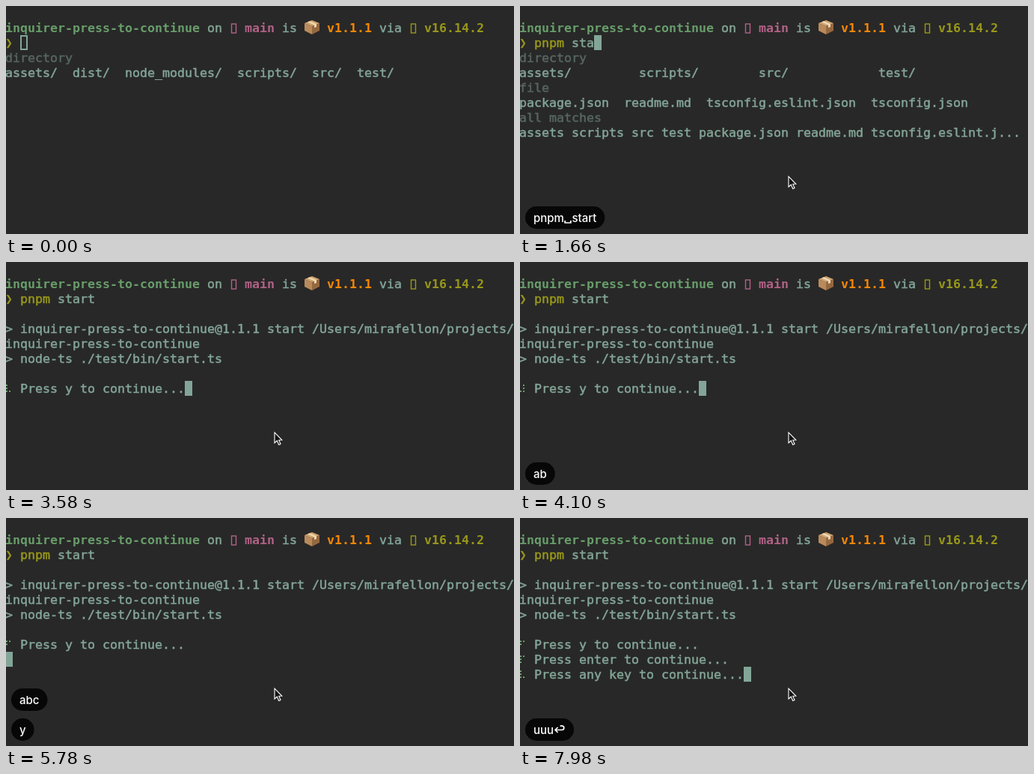
These frames come from a looping animation (679 px wide and 305 px high, 8000 ms). An HTML page with a canvas:

```html
<!DOCTYPE html>
<html lang="en">
<head>
<meta charset="utf-8">
<title>Terminal prompt demo</title>
<style>
  html, body { margin: 0; width: 100%; height: 100%; overflow: hidden; background: #282828; }
  canvas { display: block; }
</style>
</head>
<body>
<canvas id="stage" width="679" height="305"></canvas>
<script>
const ctx = document.getElementById('stage').getContext('2d');
const LOOP = 8000, CELL = 10, LINE = 20, LEFT = -1, TOP = 19;
const MONO = '16.61px "DejaVu Sans Mono", monospace';
const SANS = '500 15px Inter, sans-serif';
const color = {
  bg: '#282828', text: '#83a598', dim: '#56665f', green: '#689d6a',
  pink: '#b16286', orange: '#ff8700', olive: '#98971a'
};

const x = col => LEFT + col * CELL;
const y = row => TOP + row * LINE;

// A thin outline gives regular text its medium weight.
function write(row, col, text, fill = color.text, bold = false) {
  ctx.font = (bold ? 'bold ' : '') + MONO;
  ctx.fillStyle = ctx.strokeStyle = fill;
  ctx.fillText(text, x(col), y(row) + 16);
  if (bold) return;
  ctx.lineWidth = 0.5;
  ctx.strokeText(text, x(col), y(row) + 16);
}

function polygon(points, fill) {
  ctx.beginPath();
  points.forEach(([px, py]) => ctx.lineTo(px, py));
  ctx.closePath();
  ctx.fillStyle = fill;
  ctx.fill();
}

function missingGlyph(col, stroke) {
  ctx.strokeStyle = stroke;
  ctx.lineWidth = 1.4;
  ctx.strokeRect(x(col) + 2.5, 24, 6, 12);
}

function parcel(px, py) {
  ctx.save();
  ctx.translate(px, py);
  polygon([[0, 5], [10, 9], [10, 20], [0, 15]], '#b98a5b');
  polygon([[20, 5], [10, 9], [10, 20], [20, 15]], '#96683f');
  polygon([[0, 5], [10, 1], [20, 5], [10, 9]], '#d2a36f');
  polygon([[4, 3.4], [7, 2.2], [16, 6], [16, 10], [13, 11], [13, 7.5]], '#ecd9b4');
  ctx.restore();
}

function cursor(row, col, solid = true) {
  if (solid) {
    ctx.fillStyle = color.text;
    ctx.fillRect(x(col), y(row), CELL, LINE);
  } else {
    ctx.strokeStyle = color.text;
    ctx.lineWidth = 2;
    ctx.strokeRect(x(col) + 1, y(row) + 1, CELL - 2, LINE - 2);
  }
}

function header() {
  write(0, 0, 'inquirer-press-to-continue', color.green, true);
  write(0, 27, 'on');
  missingGlyph(30, color.pink);
  write(0, 32, 'main', color.pink, true);
  write(0, 37, 'is');
  parcel(399, 18);
  write(0, 43, 'v1.1.1', color.orange, true);
  write(0, 50, 'via');
  missingGlyph(54, color.olive);
  write(0, 56, 'v16.14.2', color.olive, true);
  write(1, 0, '❯', color.olive, true);
}

// Command typing; the shell echoes each key a little late.
const command = 'pnpm start';
const keyTimes = [980, 1060, 1130, 1200, 1280, 1360, 1440, 1500, 1560, 1600];
const ECHO = 140, RUN = 1880, OUTPUT = 2100;
const typedBy = t => keyTimes.filter(k => k <= t).length;

function completions(filtered) {
  write(2, 0, 'directory', color.dim);
  if (!filtered) {
    write(3, 0, 'assets/  dist/  node_modules/  scripts/  src/  test/');
    return;
  }
  ['assets/', 'scripts/', 'src/', 'test/'].forEach((name, i) => write(3, i * 16, name));
  write(4, 0, 'file', color.dim);
  write(5, 0, 'package.json  readme.md  tsconfig.eslint.json  tsconfig.json');
  write(6, 0, 'all matches', color.dim);
  write(7, 0, 'assets scripts src test package.json readme.md tsconfig.eslint.j...');
}

function shell(t) {
  header();
  const count = t >= RUN ? command.length : typedBy(t - ECHO);
  write(1, 2, command.slice(0, Math.min(count, 4)), color.olive);
  write(1, 6, command.slice(4, Math.max(count, 4)));
  if (t < RUN) {
    completions(count > 5);
    cursor(1, 2 + count, t >= 400);
  } else if (t < OUTPUT) {
    cursor(2, 0);
  } else {
    write(3, 0, '> inquirer-press-to-continue@1.1.1 start /Users/mirafellon/projects/');
    write(4, 0, 'inquirer-press-to-continue');
    write(5, 0, '> node-ts ./test/bin/start.ts');
    prompts(t);
  }
}

// Every tick, and every ignored key, advances the spinner by one step.
const TICK = 102.3, BLANK = 20;
const steps = [
  { key: 'y', shown: 2320, spin: 2940, stop: 5680, keys: [3700, 3960, 4600] },
  { key: 'enter', shown: 5800, spin: 6300, stop: 6840, keys: [6400, 6520, 6640] },
  { key: 'any key', shown: 6940, spin: 7200, stop: 7900, keys: [], last: true }
];
const spinner = ['124', '145', '1456', '456', '3456', '356', '236', '1236', '123', '1234'];

function braille(row, dots) {
  ctx.fillStyle = color.green;
  for (const dot of dots) {
    const i = dot - 1;
    ctx.fillRect(i < 3 ? 0 : 4, y(row) + 5 + (i % 3) * 4, 2, 2);
  }
}

function prompts(t) {
  let row = 7, col = 0;
  const now = Math.floor(t / 20) * 20;
  steps.forEach((step, i) => {
    if (now < step.shown) return;
    const running = now < step.stop;
    const elapsed = Math.min(now, step.stop) - step.spin;
    const tick = Math.floor(elapsed / TICK);
    const blank = running && elapsed >= 0 && elapsed - tick * TICK < BLANK;
    row = 7 + i;
    col = 0;
    if (blank) return;
    const ignored = step.keys.filter(k => k <= now).length;
    const frame = Math.max(0, tick + 1) + ignored;
    const text = `Press ${step.key} to continue...`;
    braille(row, spinner[frame % spinner.length]);
    write(row, 2, text);
    if (running || step.last) col = 2 + text.length;
    else row++;
  });
  cursor(row, col);
}

// Keystroke bubbles: each one is pushed up by the next and fades after a pause.
const LINGER = 1400, FADE = 200;
const bubbles = [
  { text: 'pnpm␣start↩', times: [...keyTimes, 1720] },
  { text: 'abc', times: [3700, 3960, 4600] },
  { text: 'y', times: [5640] },
  { text: 'uuu↩', times: [6400, 6520, 6640, 6840] }
];

const symbols = {
  '␣': { width: 10.5, draw(px, py) {
    ctx.moveTo(px + 1.2, py - 2);
    ctx.lineTo(px + 1.2, py + 1);
    ctx.lineTo(px + 9, py + 1);
    ctx.lineTo(px + 9, py - 2);
  } },
  '↩': { width: 16, draw(px, py) {
    ctx.moveTo(px + 5.5, py - 9);
    ctx.lineTo(px + 2, py - 5.5);
    ctx.lineTo(px + 5.5, py - 2);
    ctx.moveTo(px + 2, py - 5.5);
    ctx.lineTo(px + 11, py - 5.5);
    ctx.arc(px + 11, py - 8.2, 2.7, Math.PI / 2, -Math.PI / 2, true);
    ctx.lineTo(px + 8.5, py - 10.9);
  } }
};

function bubble(text, top, alpha) {
  ctx.save();
  ctx.globalAlpha = alpha;
  ctx.font = SANS;
  const parts = text.split(/([␣↩])/).filter(Boolean);
  const widthOf = part => symbols[part] ? symbols[part].width : ctx.measureText(part).width;
  const width = parts.reduce((sum, part) => sum + widthOf(part), 22);
  ctx.fillStyle = '#070707';
  ctx.beginPath();
  ctx.roundRect(7, top, width, 30, 15);
  ctx.fill();
  ctx.fillStyle = ctx.strokeStyle = '#fff';
  ctx.lineWidth = 1.7;
  let px = 18;
  for (const part of parts) {
    if (symbols[part]) {
      ctx.beginPath();
      symbols[part].draw(px, top + 21);
      ctx.stroke();
    } else {
      ctx.fillText(part, px, top + 21);
    }
    px += widthOf(part);
  }
  ctx.restore();
}

function keystrokes(t) {
  bubbles.forEach(({ text, times }, i) => {
    const count = times.filter(k => k <= t).length;
    const alpha = Math.min(1, 1 - (t - times[times.length - 1] - LINGER) / FADE);
    if (!count || alpha <= 0) return;
    const next = bubbles[i + 1];
    const pushed = next && t >= next.times[0];
    bubble(text.slice(0, count), pushed ? 228 : 268, alpha);
  });
}

function pointer(t) {
  if (t < 380) return;
  const rest = (1 - Math.min(1, (t - 380) / 280)) ** 2;
  ctx.save();
  ctx.translate(359 + 5 * rest, 228 + 26 * rest);
  polygon([[0, 0], [0, 14], [3.3, 11], [5.7, 16.5], [8, 15.5], [5.7, 10.2], [9.8, 10]], '#111');
  ctx.strokeStyle = '#fff';
  ctx.lineWidth = 1.1;
  ctx.stroke();
  ctx.restore();
}

function draw(now) {
  const t = now % LOOP;
  ctx.fillStyle = color.bg;
  ctx.fillRect(0, 0, 679, 305);
  shell(t);
  keystrokes(t);
  pointer(t);
}

const start = performance.now();
function loop() {
  draw(performance.now() - start);
  requestAnimationFrame(loop);
}
loop();
</script>
</body>
</html>
```
